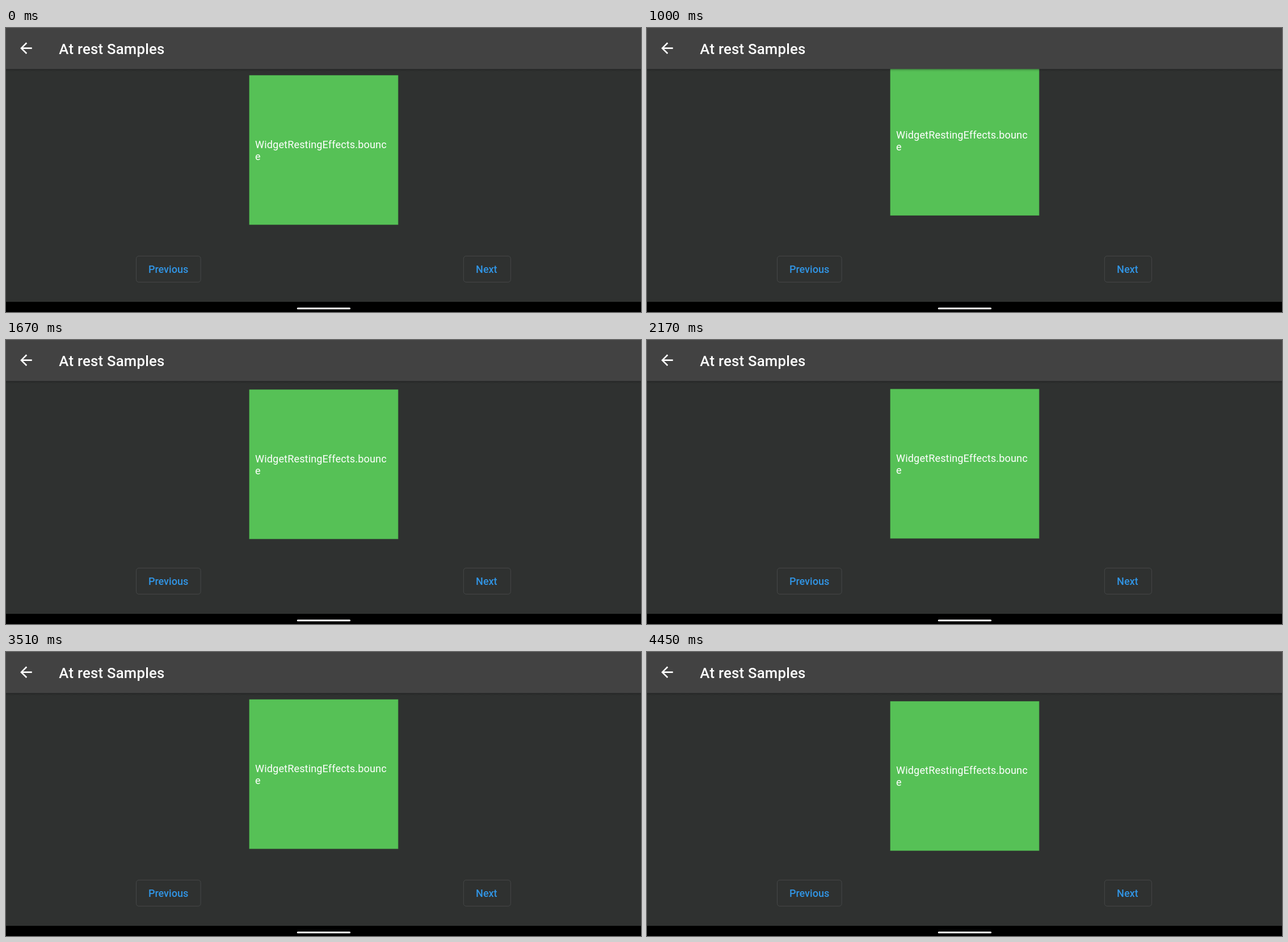
Recreate the animation shown at these times as an HTML page. Size 1119x501 px, loop 4480 ms.

```html
<!DOCTYPE html>
<html lang="en">
<head>
<meta charset="utf-8">
<title>At rest Samples</title>
<style>
  html, body { margin: 0; width: 100%; height: 100%; overflow: hidden; background: #2f3130; }
  svg { display: block; width: 1119px; height: 501px; }
  text { font: 18px Roboto, sans-serif; fill: #fff; }
  .title { font-size: 25.7px; font-weight: 500; letter-spacing: .25px; }
  .label { letter-spacing: .17px; }
  .button rect { fill: none; stroke: #464848; }
  .button text { font-weight: 500; fill: #3195e5; }
</style>
</head>
<body>
<svg viewBox="0 0 1119 501">
  <defs>
    <linearGradient id="shade" x2="0" y2="1">
      <stop offset="0" stop-opacity=".35"/>
      <stop offset=".4" stop-opacity=".1"/>
      <stop offset="1" stop-opacity="0"/>
    </linearGradient>
  </defs>
  <rect width="1119" height="501" fill="#2f3130"/>

  <g id="box">
    <rect x="428.5" width="262.8" height="263.9" fill="#469f47"/>
    <rect x="429" y=".4" width="261.6" height="262.9" fill="#56c156"/>
    <g class="label">
      <text x="439.1" y="128.2">WidgetRestingEffects.bounc</text>
      <text x="439.1" y="149.3">e</text>
    </g>
  </g>

  <rect y="72.4" width="1119" height="5" fill="url(#shade)"/>
  <rect width="1119" height="72.4" fill="#424242"/>
  <path transform="translate(20 20.2) scale(1.286)" fill="#fff"
        d="M20 11H7.83l5.59-5.59L12 4l-8 8 8 8 1.41-1.41L7.83 13H20z"/>
  <text class="title" x="93.3" y="45.8">At rest Samples</text>

  <g class="button">
    <rect x="229.5" y="402.3" width="113.6" height="46" rx="4.5"/>
    <text x="250.9" y="432">Previous</text>
    <rect x="806.3" y="402.3" width="83" height="46" rx="4.5"/>
    <text x="828.1" y="432">Next</text>
  </g>

  <rect y="483" width="1119" height="18" fill="#000"/>
  <rect x="512.7" y="493.2" width="94.3" height="3" rx="1.5" fill="#fff"/>
</svg>
<script>
  const LOOP = 4480, RISE = 1106, FALL = 1200, CYCLE = RISE + FALL;
  const TOP_AT = 806;   // first moment at the highest point
  const REST_Y = 87.8, HEIGHT = 26;
  const box = document.getElementById('box');

  function bounceOut(u) {
    const k = 7.5625;
    if (u < 1 / 2.75) return k * u * u;
    if (u < 2 / 2.75) return k * (u - 1.5 / 2.75) ** 2 + .75;
    if (u < 2.5 / 2.75) return k * (u - 2.25 / 2.75) ** 2 + .9375;
    return k * (u - 2.625 / 2.75) ** 2 + .984375;
  }

  function lift(t) {
    const p = (t - TOP_AT + CYCLE) % CYCLE;
    return p < FALL
      ? 1 - bounceOut(p / FALL)
      : (1 - Math.cos(Math.PI * (p - FALL) / RISE)) / 2;
  }

  const start = performance.now();
  function draw(now) {
    const t = Math.max(0, now - start) % LOOP;
    box.setAttribute('transform', `translate(0 ${(REST_Y - HEIGHT * lift(t)).toFixed(2)})`);
    requestAnimationFrame(draw);
  }
  draw(start);
</script>
</body>
</html>
```
